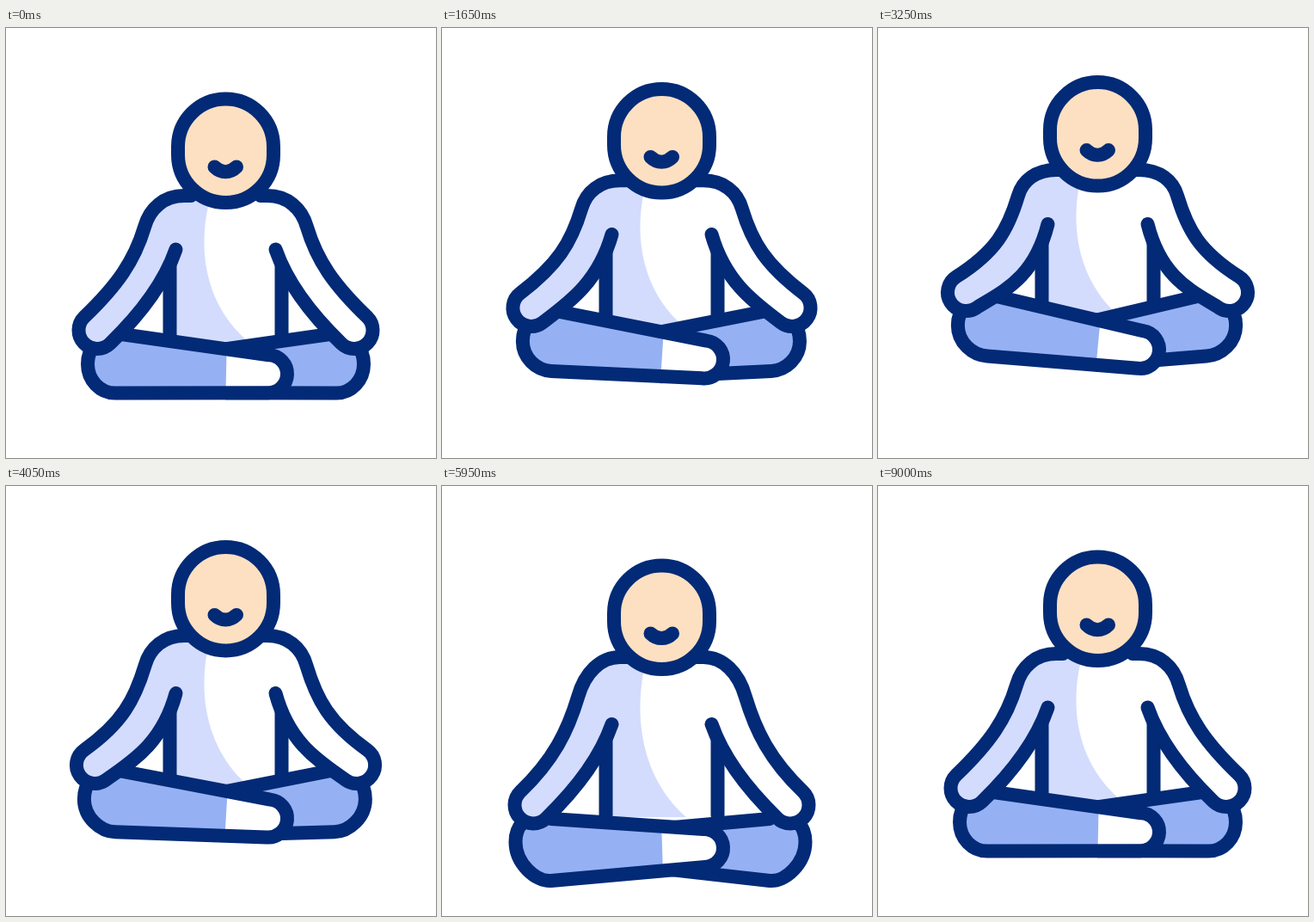
Recreate the animation shown at these times as an HTML page. Size 500 by 500 pixels, loop 9.05 s.

```html
<!DOCTYPE html>
<html lang="en">
<head>
<meta charset="utf-8">
<title>Breathing meditation</title>
<style>
  html, body { margin: 0; width: 100%; height: 100%; overflow: hidden; background: #fff; }
  svg { display: block; width: 100%; height: 100%; }
  path { fill: none; stroke-linecap: round; stroke-linejoin: round; }
  .line { stroke: #032a76; stroke-width: 16; }
  .light { fill: #d3dcfd; }
  .blue { fill: #95b1f3; }
  .white { fill: #fff; }
  .skin { fill: #fde0c1; }
</style>
</head>
<body>
<svg viewBox="0 0 500 500">
  <clipPath id="half"><rect width="256" height="500"/></clipPath>
  <path class="light" data-shape="shade"/>
  <path class="line" data-shape="side"/>
  <path class="line" data-shape="side" transform="translate(511) scale(-1 1)"/>
  <g id="backLeg"><path class="line blue" data-shape="backLeg" clip-path="url(#half)"/></g>
  <path class="blue" data-shape="leg"/>
  <path class="white" data-shape="foot"/>
  <path class="line" data-shape="leg"/>
  <path class="line light" data-shape="arm"/>
  <path class="line white" data-shape="arm" transform="translate(511) scale(-1 1)"/>
  <g id="head">
    <rect class="line skin" x="200" y="82.5" width="111" height="120.5" rx="55.5"/>
    <path class="line" d="M242.5 161.5C250 169 260.5 169 268 161.5"/>
  </g>
</svg>
<script>
// Body measures at rest, inhaled and exhaled; angles in degrees.
const keys = {
  head: [0, -20, 10],
  shoulder: [195, 164.3, 199],
  shoulderDrop: [36, 30, 46],
  armpit: [257.5, 227, 277],
  elbow: [46, 64, 46],
  handX: [106, 102.4, 106],
  handY: [351.5, 306.2, 371],
  handTilt: [46, 58, 46],
  kneeX: [95, 93, 85.5],
  kneeY: [391, 344.6, 414],
  seat: [424.5, 380, 459],
  thigh: [355, 308, 387],
  ankle: [402.3, 373, 421],
  ankleTilt: [2, 9, -3],
  backAnkle: [22, 22, 18],
  legMirror: [511, 509, 508]
};
const STEP = 50, PHASE = 3000, LOOP = 9050;
const HAND = 21.5, ANKLE = 22, LEG_X = 127, ANKLE_X = 305, ARMPIT_X = 197.5;

const along = ([x, y], degrees, length) => {
  const a = degrees * Math.PI / 180;
  return [x + length * Math.cos(a), y + length * Math.sin(a)];
};
const mix = (a, b, k) => a + (b - a) * k;
const between = (p, q, k) => [mix(p[0], q[0], k), mix(p[1], q[1], k)];

function legPoints(p, ankleSize) {
  const ankle = [ANKLE_X, p.ankle];
  return {
    seat: [LEG_X, p.seat],
    thigh: [LEG_X, p.thigh],
    top: along(ankle, p.ankleTilt - 90, ankleSize),
    bottom: along(ankle, p.ankleTilt + 90, ankleSize)
  };
}

function legPath(p, ankleSize) {
  const { seat, thigh, top, bottom } = legPoints(p, ankleSize);
  const x = p.kneeX, y = p.kneeY;
  return `M${x + 8} ${y - 22}Q${x} ${y - 14} ${x} ${y}
    C${x} ${mix(y, p.seat, 0.55)} ${between(seat, bottom, -0.1)} ${seat}
    L${bottom}A${ANKLE} ${ANKLE} 0 0 0 ${top}L${thigh}`;
}

const shapes = {
  arm(p) {
    const hand = [p.handX, p.handY];
    const outer = along(hand, p.handTilt, -HAND);
    const inner = along(hand, p.handTilt, HAND);
    const forearm = p.handTilt - 90;
    const drop = p.shoulderDrop;
    const x = 172 - 0.3 * drop, y = p.shoulder + drop;
    return `M215 ${p.shoulder}H207
      C184 ${p.shoulder} ${x + 0.17 * drop} ${y - 0.6 * drop} ${x} ${y}
      C${x - 12} ${y + 40} ${along(outer, forearm, 54)} ${outer}
      A21 21 0 0 0 ${inner}
      C${along(inner, forearm, 37)} ${ARMPIT_X - 16} ${p.armpit + p.elbow} ${ARMPIT_X} ${p.armpit}`;
  },
  leg: p => legPath(p, ANKLE),
  backLeg: p => legPath(p, p.backAnkle),
  foot(p) {
    const { seat, thigh, top, bottom } = legPoints(p, ANKLE);
    return `M${between(thigh, top, 0.725)}L${top}A${ANKLE} ${ANKLE} 0 0 1 ${bottom}
      L${between(seat, bottom, 0.725)}Z`;
  },
  shade(p) {
    const waist = p.ankle - 36;
    const level = k => mix(p.shoulder, waist, k);
    return `M190.5 ${p.shoulder}H238C219 ${level(0.41)} 237 ${level(0.78)} 284 ${waist}H190.5Z`;
  },
  side: p => `M190.5 ${p.armpit + 19}V${p.ankle - 38}`
};

const parts = [...document.querySelectorAll('[data-shape]')];
const head = document.getElementById('head');
const backLeg = document.getElementById('backLeg');

function draw(time) {
  const phase = Math.min(2, Math.floor(time / PHASE));
  const u = time / PHASE - phase;
  const ease = u * u * (3 - 2 * u);
  const pose = {};
  for (const [name, values] of Object.entries(keys)) {
    pose[name] = mix(values[phase], values[(phase + 1) % 3], ease);
  }
  for (const part of parts) part.setAttribute('d', shapes[part.dataset.shape](pose));
  head.setAttribute('transform', `translate(0 ${pose.head})`);
  backLeg.setAttribute('transform', `translate(${pose.legMirror}) scale(-1 1)`);
}

function tick() {
  draw(Math.floor((performance.now() % LOOP) / STEP) * STEP);
  requestAnimationFrame(tick);
}
tick();
</script>
</body>
</html>
```
